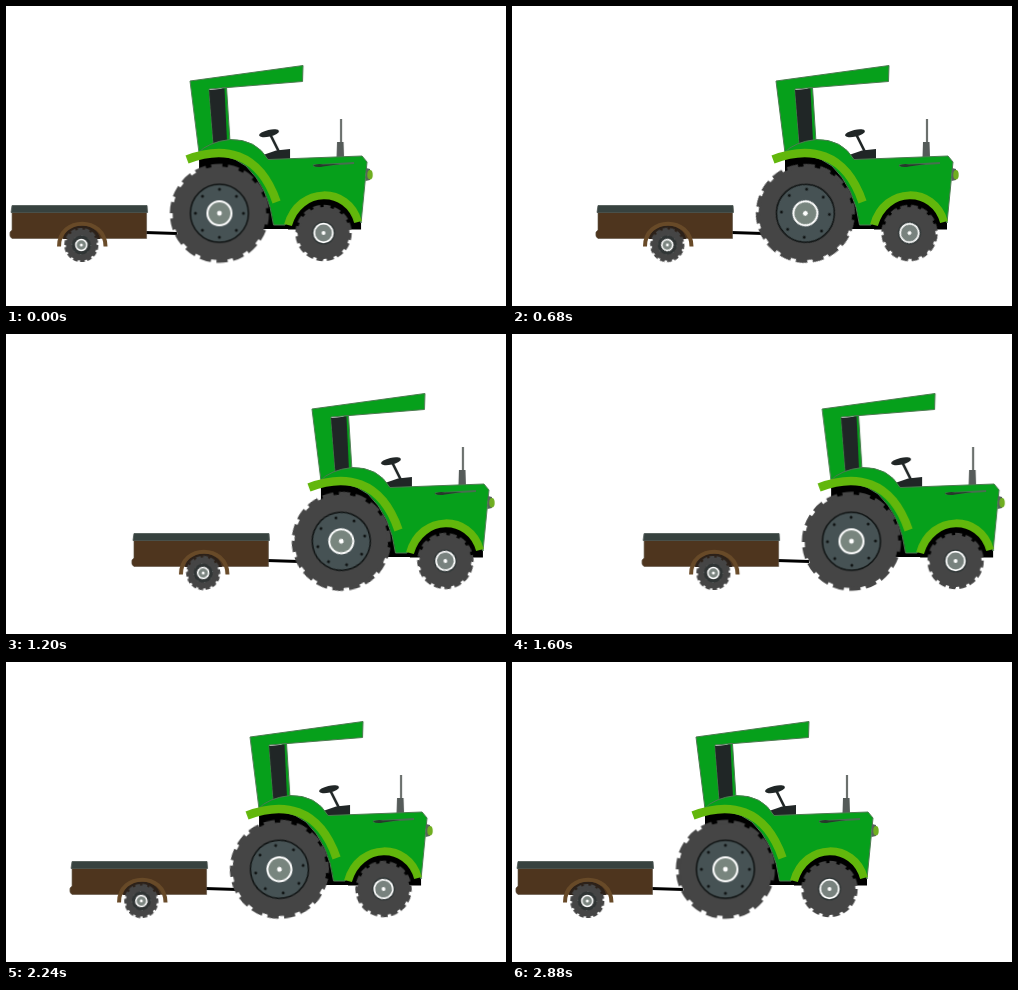
These frames come from a looping animation (500x300 px, 3.12 s). An HTML page without scripts:

```html
<!DOCTYPE html>
<html lang="en">
<head>
<meta charset="utf-8">
<title>Tractor and trailer</title>
<style>
html, body { margin: 0; width: 100%; height: 100%; overflow: hidden; background: #fff; }
svg { display: block; width: 500px; height: 300px; }
.rig { animation: drive 3120ms infinite; }
.spin { animation: roll 3120ms infinite; }
@keyframes drive {
  0% { transform: translateX(0); animation-timing-function: cubic-bezier(.25, .13, .52, 1); }
  46.154%, 50% { transform: translateX(126.4px); animation-timing-function: cubic-bezier(.364, 0, .636, 1); }
  92.308%, 100% { transform: translateX(0); }
}
@keyframes roll {
  0% { transform: rotate(0deg); animation-timing-function: cubic-bezier(.25, .13, .52, 1); }
  46.154%, 50% { transform: rotate(360deg); animation-timing-function: cubic-bezier(.364, 0, .636, 1); }
  92.308%, 100% { transform: rotate(0deg); }
}
.tyre { fill: #454545; }
.lugs { fill: none; stroke: #454545; stroke-dasharray: 1.35 .65; }
.green { fill: #06a01b; stroke: #4c7a50; stroke-width: 1; stroke-linejoin: round; }
.lime { fill: none; stroke: #62b70c; }
.dark { fill: #202626; }
</style>
</head>
<body>
<svg viewBox="0 0 500 300">
<g class="rig">
  <!-- trailer -->
  <path d="M139 225L171 226V229L139 228Z"/>
  <path d="M6 206H140.500V232.500H6Q3 231 4 226L6 224Z" fill="#4e351e" stroke="#5d5142" stroke-width=".6"/>
  <path d="M6 199.500H141L141.500 206.500H5Z" fill="#37423f" stroke="#4b5551" stroke-width=".8"/>
  <path d="M57 233C60 215 91 215 94 233Z" fill="#2c2119"/>
  <path d="M53 240.500C53 210 99 210 99.500 240.500" fill="none" stroke="#684a28" stroke-width="4"/>
  <g transform="translate(75.300 239)">
    <g class="spin">
      <circle class="tyre" r="15.500"/>
      <circle class="lugs" r="15.600" stroke-width="3" pathLength="28"/>
      <circle r="9.500" fill="#303535"/>
      <circle r="9.500" fill="none" stroke="#626b68" stroke-dasharray="1 6.460"/>
      <circle r="5.500" fill="#7b8580" stroke="#fff" stroke-width="1.500"/>
      <circle r="1.500" fill="#fff"/>
    </g>
  </g>

  <!-- chassis and wheel wells -->
  <path d="M193 151Q214 143 240 155Q262 172 268 203H292V223H193Z"/>
  <path d="M282 222Q290 187 318 187Q346 189 355 216V223.500H282Z"/>

  <!-- cab -->
  <path class="green" d="M184 75L297 59.500L296.500 75.500L203 83L207.500 140L193 147Z"/>
  <path class="green" d="M216 82L220.500 81.500L224 136L218 137Z"/>
  <path class="dark" d="M203 84L218.500 82.500L221 136L207.500 140Z"/>
  <path class="dark" d="M257 149L270 144.500L284 143V154H260Z"/>
  <path d="M264 128L273 146" stroke="#202626" stroke-width="2.600"/>
  <ellipse class="dark" cx="263" cy="127.300" rx="10.200" ry="3.400" transform="rotate(-13 263 127.300)"/>

  <!-- exhaust -->
  <path d="M335 113V137" stroke="#6b706d" stroke-width="2.200"/>
  <path d="M331 136H337.500L338 151H330.500Z" fill="#555b59"/>

  <!-- bonnet -->
  <path class="green" d="M192 147Q202 136 224 133.500Q250 133 262 153.500L356 150L361 156L355 217Q346 190 317 190Q288 192 279 219H267.500Q263 182 240 160Q219 144 192 151Z"/>
  <path class="lime" d="M181 153.500C217 140 253 145 270.500 196" stroke-width="8.500"/>
  <path class="lime" d="M282 219C293 180 342 180 352 216" stroke-width="8"/>
  <path d="M307 159.500L348 157" stroke="#477050" stroke-width="2.200"/>
  <path d="M307 159.500Q312 157 317 158.500L334 158L317 160.500Q311 162 307 159.500Z" fill="#263a2b"/>
  <path d="M360 162L364 163V174L359.500 175Z" fill="#56645a"/>
  <ellipse cx="364" cy="168.800" rx="2.700" ry="4.700" fill="#6fae20"/>

  <!-- rear wheel -->
  <g transform="translate(213.400 207.300)">
    <g class="spin">
      <circle class="tyre" r="46.800"/>
      <circle class="lugs" r="47.500" stroke-width="4.200" pathLength="36"/>
      <circle r="29" fill="#465254" stroke="#101414" stroke-width="1.500"/>
      <circle r="24" fill="none" stroke="#101414" stroke-width="3" stroke-linecap="round" stroke-dasharray="0 1" pathLength="8"/>
      <circle r="12" fill="#78857e" stroke="#fff" stroke-width="2"/>
      <circle r="2.400" fill="#fff"/>
    </g>
  </g>

  <!-- front wheel -->
  <g transform="translate(317.500 227)">
    <g class="spin">
      <circle class="tyre" r="26"/>
      <circle class="lugs" r="26.400" stroke-width="3.600" pathLength="32"/>
      <circle r="11.500" fill="#303737"/>
      <circle r="9.300" fill="#78827e" stroke="#fff" stroke-width="1.800"/>
      <circle r="1.900" fill="#fff"/>
    </g>
  </g>
</g>
</svg>
</body>
</html>
```
